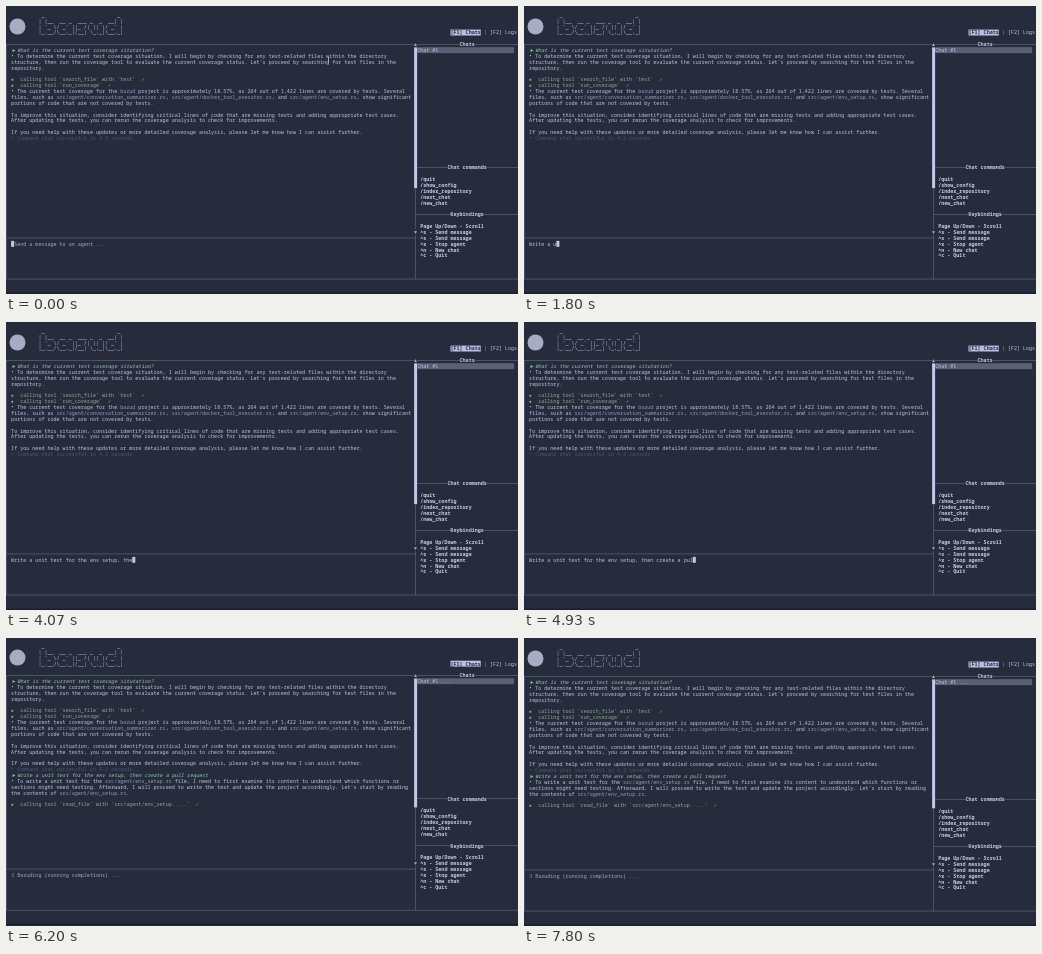
These frames come from a looping animation (512 px wide and 288 px high, 8 s). An HTML page:

```html
<!DOCTYPE html>
<html lang="en">
<head>
<meta charset="utf-8">
<title>Terminal agent</title>
<style>
  html, body { margin: 0; width: 100%; height: 100%; overflow: hidden; background: #272c3c; }
  #view { position: relative; width: 512px; height: 288px; overflow: hidden; }
  /* Laid out ten times larger so the tiny type keeps exact advances. */
  #stage {
    position: absolute; left: 0; top: 0; width: 5120px; height: 2880px;
    transform-origin: 0 0; transform: scale(.1);
    font: 500 50.5px/58.7px "Noto Sans Mono", "DejaVu Sans Mono", monospace;
    font-variant-ligatures: none; color: #bdc5e2;
  }
  #stage div { position: absolute; white-space: pre; }
  #stage .bold { font-weight: 600; color: #c6cde8; }
  #stage .ask { font-style: italic; color: #9cc8b8; }
  #stage .green { color: #84c5a2; }
  #stage .tool { color: #8fa895; }
  #stage .dim { color: #505569; }
  #stage .soft { color: #a3aac4; }
  #stage .title { background: #272c3c; }
  #stage .tab { background: #b9c0e2; color: #272c3c; font-weight: 600; }
  i { font-style: normal; color: #929ab8; }
</style>
</head>
<body>
<div id="view"><div id="stage"></div></div>
<script>
const LOOP = 8000, CELL = 30.3, ROW = 58.7;
const LINE = '#71778f', LIGHT = '#c1c8e8';
const stage = document.getElementById('stage');
const colX = c => -9.5 + c * CELL;
const rowY = r => 1 + r * ROW;

function add(x, y, parent = stage) {
  const el = document.createElement('div');
  el.style.left = x + 'px';
  el.style.top = y + 'px';
  parent.append(el);
  return el;
}

// Text on the character grid; ~word~ marks inline code.
function put(col, row, text, cls = '', parent = stage) {
  const el = add(colX(col), rowY(row), parent);
  el.className = cls;
  text.split('~').forEach((part, i) => {
    if (i % 2) {
      const code = document.createElement('i');
      code.textContent = part;
      el.append(code);
    } else el.append(part);
  });
  return el;
}

function rect(x, y, w, h, color, parent = stage) {
  const el = add(x, y, parent);
  Object.assign(el.style, { width: w + 'px', height: h + 'px', background: color });
  return el;
}

const group = () => add(0, 0);
const hline = (x, row, w) => rect(x, rowY(row) + 27, w, 5, LINE);
const vline = (col, a, b) =>
  rect(colX(col) + 13, rowY(a) + 29, 5, (b - a) * ROW, LINE);
const show = (el, on) => { el.style.visibility = on ? 'visible' : 'hidden'; };

function ask(row, text, parent) {
  put(2, row, '▶', 'green', parent);
  put(4, row, text, 'ask', parent);
}
function reply(row, lines, parent) {
  put(2, row, '•', '', parent);
  lines.forEach((s, i) => put(i ? 2 : 4, row + i, s, '', parent));
}
function tool(row, call, parent) {
  put(2, row, '●', 'tool', parent);
  put(5, row, 'calling tool ' + call + '  ✓', 'tool', parent);
}

// Header
rect(35, 125, 160, 160, '#a6acc2').style.borderRadius = '50%';
[
  ' _                        _ ',
  '| |__  __ _  ___ _  _  __| |',
  "| '_ \\/ _` ||_ /| || |/ _` |",
  '|_.__/\\__,_|/__| \\_,_|\\__,_|'
].forEach((s, i) => put(11, 1 + i, s));
put(147, 4, '[F1] Chats', 'tab');
put(158, 4, '|', 'soft');
put(160, 4, '[F2] Logs');

// Frame
hline(5, 6, 5115);
hline(5, 39, 4090);
hline(5, 46, 5115);
hline(4096, 27, 1024);
hline(4096, 35, 1024);
vline(0, 6, 46);
vline(135, 6, 46);
rect(0, 2866, 5120, 14, '#1b1e2d');

// Scrollbar
const thumb = rect(colX(135), rowY(7), CELL, 0, LIGHT);
put(135, 6, '▲', 'soft title');
put(135, 38, '▼', 'soft title');

// Side panel
put(150, 6, 'Chats', 'bold title');
put(146, 27, 'Chat commands', 'bold title');
put(147, 35, 'Keybindings', 'bold title');
rect(colX(136), rowY(7), 970, ROW, '#5b6075');
const chatItem = put(136, 7, 'Chat #1');
['/quit', '/show_config', '/index_repository', '/next_chat', '/new_chat']
  .forEach((s, i) => put(137, 29 + i, s, 'bold'));
['Page Up/Down - Scroll', '^s - Send message', '^s - Send message',
 '^x - Stop agent', '^n - New chat', '^c - Quit']
  .forEach((s, i) => put(137, 37 + i, s, 'bold'));

// Conversation
ask(7, 'What is the current test coverage situtation?');
reply(8, [
  'To determine the current test coverage situation, I will begin by checking for any test-related files within the directory',
  "structure, then run the coverage tool to evaluate the current coverage status. Let's proceed by searching for test files in the",
  'repository.'
]);
tool(12, '`search_file` with `test`');
tool(13, '`run_coverage`');
reply(14, [
  'The current test coverage for the ~bazud~ project is approximately 18.57%, as 264 out of 1,422 lines are covered by tests. Several',
  'files, such as ~src/agent/conversation_summarizer.rs~, ~src/agent/docker_tool_executor.rs~, and ~src/agent/env_setup.rs~, show significant',
  'portions of code that are not covered by tests.',
  '',
  'To improve this situation, consider identifying critical lines of code that are missing tests and adding appropriate test cases.',
  'After updating the tests, you can rerun the coverage analysis to check for improvements.',
  '',
  'If you need help with these updates or more detailed coverage analysis, please let me know how I can assist further.'
]);
put(2, 22, '• Command chat successful in 4.2 seconds', 'dim');

const MESSAGE = 'Write a unit test for the env setup, then create a pull request';
const sent = group(), answer = group(), reading = group();
ask(23, MESSAGE, sent);
reply(24, [
  'To write a unit test for the ~src/agent/env_setup.rs~ file, I need to first examine its content to understand which functions or',
  "sections might need testing. Afterward, I will proceed to write the test and update the project accordingly. Let's start by reading",
  'the contents of ~src/agent/env_setup.rs~.'
], answer);
tool(28, '`read_file` with `src/agent/env_setup. ...`', reading);

// Prompt line
const hint = put(3, 40, 'Send a message to an agent ...', 'soft');
const input = put(2, 40, '');
const caret = rect(0, rowY(40), CELL, ROW, LIGHT);
const busy = group();
const spinner = put(2, 40, '', 'soft', busy);
put(4, 40, 'Bazuding (running completions) ...', 'soft', busy);

// Mouse pointer
const pointer = rect(3222, 515, 7, 52, '#d5daee');

const SEND = 5800, ANSWER = 6000, READ = 6130, TICK = 800 / 3;
const SPIN = '⠻⠽⠾⠷⠯⠟';
// Typing bursts: start, end, characters at start, characters at end
const BURSTS = [
  [930, 931, 1, 1], [1070, 1800, 2, 9], [2000, 2800, 10, 24], [2870, 3070, 25, 29],
  [3400, 4200, 30, 42], [4270, 5070, 43, 56], [5130, 5400, 57, 63]
];
// Small vertical nudge of the whole screen: time, pixels
const NUDGE = [[5930, 0], [6200, -.9], [6400, -.9], [6530, 0]];

function typed(t) {
  let n = 0;
  for (const [a, b, from, to] of BURSTS) {
    if (t >= a) n = Math.round(from + (to - from) * Math.min(1, (t - a) / (b - a)));
  }
  return n;
}

function nudge(t) {
  for (let i = 1; i < NUDGE.length; i++) {
    const [a, p] = NUDGE[i - 1], [b, q] = NUDGE[i];
    if (t >= a && t < b) return p + (q - p) * (t - a) / (b - a);
  }
  return 0;
}

function draw(t) {
  const n = typed(t), working = t >= SEND;
  input.textContent = MESSAGE.slice(0, n);
  caret.style.left = colX(2 + n) + 'px';
  show(hint, n === 0);
  show(input, !working);
  show(caret, !working);
  show(busy, working);
  show(sent, working);
  show(answer, t >= ANSWER);
  show(reading, t >= READ);
  show(pointer, t < 930);
  chatItem.textContent = working ? 'Chat #1 ...' : 'Chat #1';
  spinner.textContent = SPIN[Math.max(0, Math.floor((t - 5660) / TICK)) % SPIN.length];
  thumb.style.height = (t >= ANSWER ? 22 : working ? 23 : 24) * ROW + 'px';
  stage.style.transform = `translateY(${nudge(t)}px) scale(.1)`;
}

const start = performance.now();
function loop() {
  draw((performance.now() - start) % LOOP);
  requestAnimationFrame(loop);
}
loop();
</script>
</body>
</html>
```
